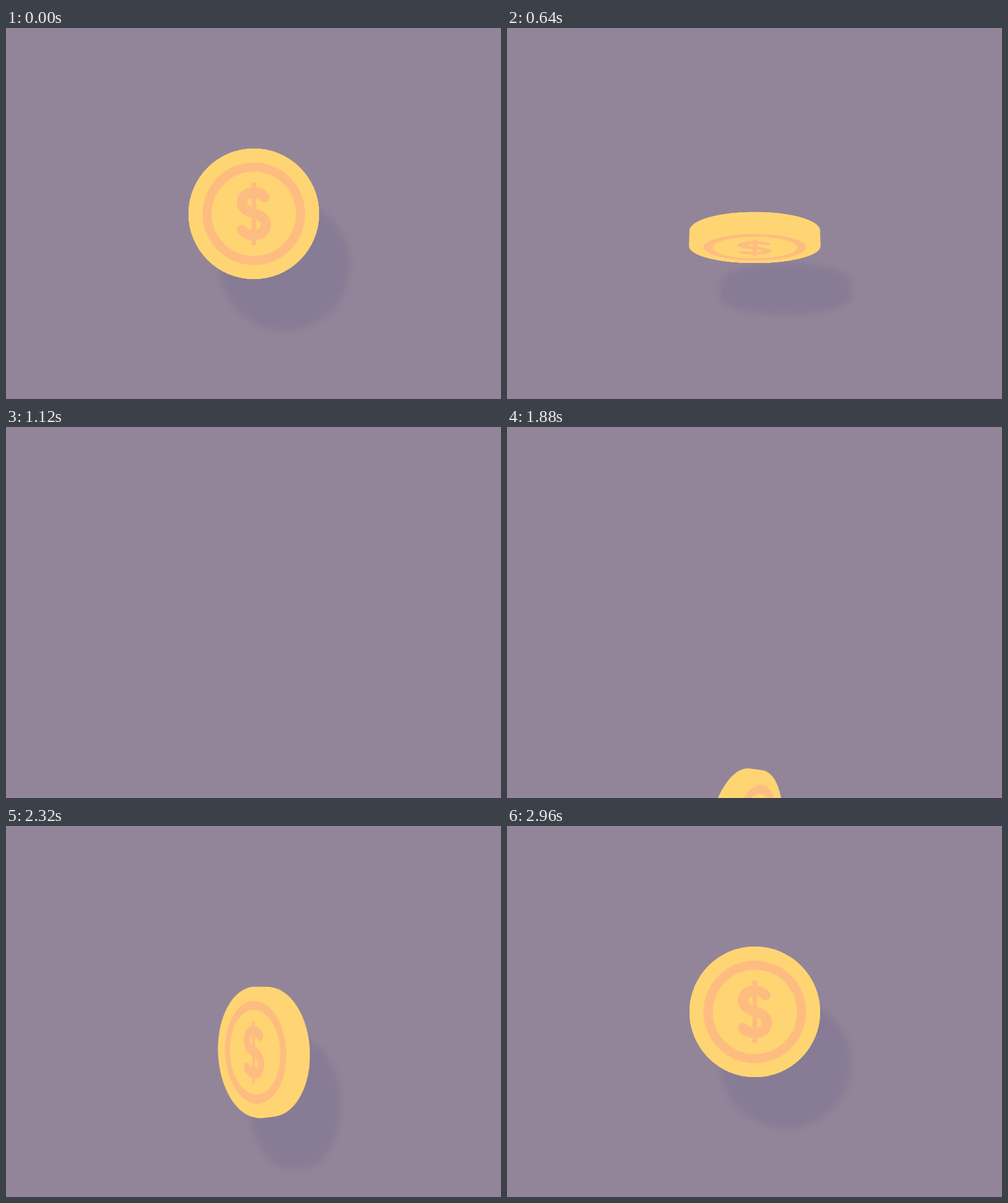
These frames come from a looping animation (800x600 px, 3000 ms). An HTML page without scripts:

```html
<!DOCTYPE html>
<html lang="en">
<head>
<meta charset="utf-8">
<title>Coin flip</title>
<style>
  /* seconds since the drop began, and seconds left until the coin has landed */
  @property --drop { syntax: "<number>"; inherits: true; initial-value: 0; }
  @property --rise { syntax: "<number>"; inherits: true; initial-value: 0; }

  html, body { margin: 0; width: 100%; height: 100%; overflow: hidden; background: #938599; }

  .stage {
    position: absolute; left: 0; top: 0; width: 800px; height: 600px; overflow: hidden;
  }
  .scene {
    position: absolute; inset: 0;
    perspective: 1000px;
    filter: drop-shadow(50px 83px 6px rgba(92, 83, 133, .2));
  }
  .coin {
    --d2: calc(var(--drop) * var(--drop));
    --r2: calc(var(--rise) * var(--rise));
    --fall: calc(var(--d2) * (66 + 167.5 * var(--d2)));
    --lift: calc(var(--r2) * (113 + 15 * var(--r2) + 101 * var(--r2) * var(--r2)));
    position: absolute; left: 294.5px; top: 194.5px; width: 211px; height: 211px;
    transform-style: preserve-3d;
    transform:
      translateY(calc((var(--fall) + var(--lift)) * 1px))
      rotateX(calc(var(--fall) * -1.3deg))
      rotateY(calc(var(--lift) * -.82deg));
    animation: move 3s linear infinite, show 3s step-end infinite;
  }
  .coin > * { position: absolute; left: 0; top: 0; width: 211px; height: 211px; }
  .coin i {
    border-radius: 50%; background: #ffd573;
    transform: translateZ(calc(var(--z) * -1px));
  }
  .face { backface-visibility: hidden; transform: translateZ(.3px); }
  .back { transform: rotateY(180deg) translateZ(27.3px); }

  @keyframes move {
    0% { --drop: 0; --rise: 0; }
    37.333% { --drop: 1.12; --rise: 0; }
    37.334% { --drop: 0; --rise: 1.12; }
    62.667% { --drop: 0; --rise: 1.12; }
    100% { --drop: 0; --rise: 0; }
  }
  @keyframes show {
    0% { visibility: visible; }
    37.3% { visibility: hidden; }
    62.66%, 100% { visibility: visible; }
  }
</style>
</head>
<body>
<div class="stage">
  <div class="scene">
    <div class="coin">
      <i style="--z:27"></i><i style="--z:26"></i><i style="--z:25"></i><i style="--z:24"></i>
      <i style="--z:23"></i><i style="--z:22"></i><i style="--z:21"></i><i style="--z:20"></i>
      <i style="--z:19"></i><i style="--z:18"></i><i style="--z:17"></i><i style="--z:16"></i>
      <i style="--z:15"></i><i style="--z:14"></i><i style="--z:13"></i><i style="--z:12"></i>
      <i style="--z:11"></i><i style="--z:10"></i><i style="--z:9"></i><i style="--z:8"></i>
      <i style="--z:7"></i><i style="--z:6"></i><i style="--z:5"></i><i style="--z:4"></i>
      <i style="--z:3"></i><i style="--z:2"></i><i style="--z:1"></i><i style="--z:0"></i>
      <svg class="face back" viewBox="-105.5 -105.5 211 211"><use href="#mark"/></svg>
      <svg class="face" viewBox="-105.5 -105.5 211 211">
        <g id="mark" fill="none" stroke="#febd80">
          <circle r="75.5" stroke-width="15"/>
          <path d="M0 -50.5V50.5" stroke-width="7.5"/>
          <path stroke-width="17" stroke-linecap="round" d="M17 -27C13 -32 7 -34.5 0 -34.5C-12 -34.5 -19 -28 -19 -19C-19 -8 -10 -4 0 -1C12 3 19.5 7 19.5 18C19.5 28 11 34 0 34C-9 34 -15 32 -19 26"/>
        </g>
      </svg>
    </div>
  </div>
</div>
</body>
</html>
```
